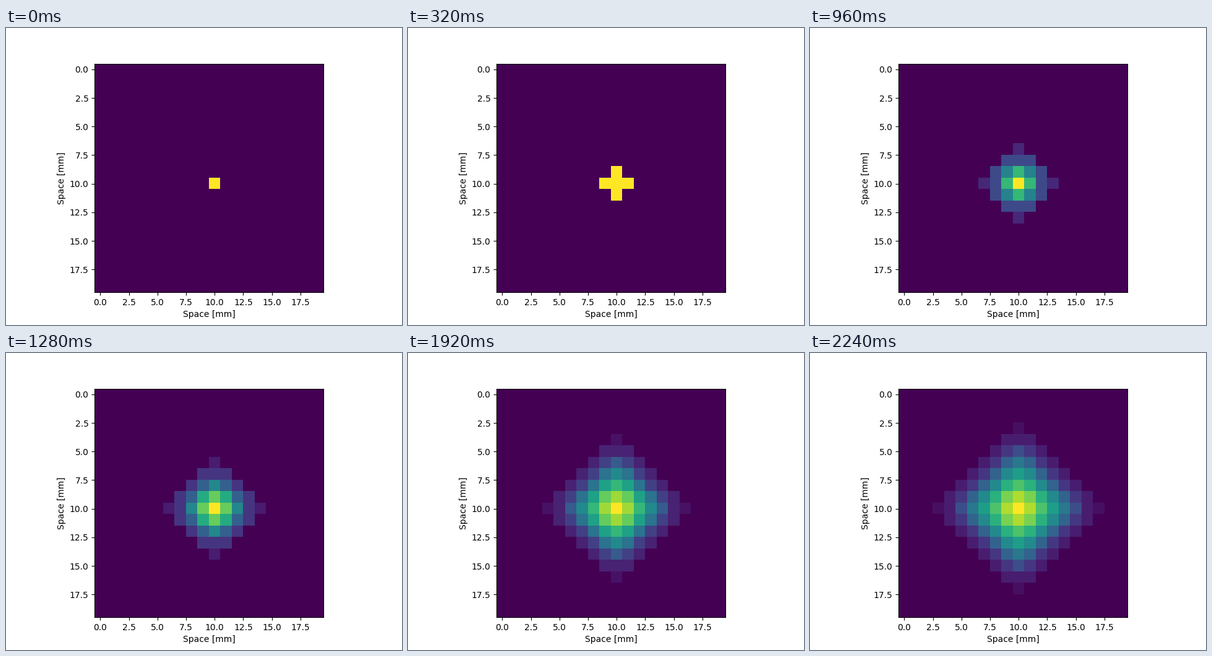
Animation of 640x480 px, one loop 2.56 s. Source, as a matplotlib script:

```python
import numpy as np
import matplotlib.pyplot as plt
from matplotlib.animation import FuncAnimation

SIZE = 20
STEPS = 8
STEP_MS = 320


def spread(grid):
    """Each cell gains one unit per occupied direct neighbour."""
    full = np.pad(grid > 0, 1).astype(int)
    return grid + full[:-2, 1:-1] + full[2:, 1:-1] + full[1:-1, :-2] + full[1:-1, 2:]


seed = np.zeros((SIZE, SIZE), dtype=int)
seed[SIZE // 2, SIZE // 2] = 1
states = [seed]
while len(states) < STEPS:
    states.append(spread(states[-1]))

fig, ax = plt.subplots(figsize=(6.4, 4.8), dpi=100)
image = ax.imshow(seed, cmap="viridis", interpolation="nearest")
ax.set_xlabel("Space [mm]")
ax.set_ylabel("Space [mm]")


def update(i):
    grid = states[i % STEPS]
    image.set_data(grid)
    image.set_clim(0, grid.max())
    return [image]


anim = FuncAnimation(fig, update, frames=STEPS, interval=STEP_MS,
                     repeat=True, repeat_delay=0, blit=False)
plt.show()
```
